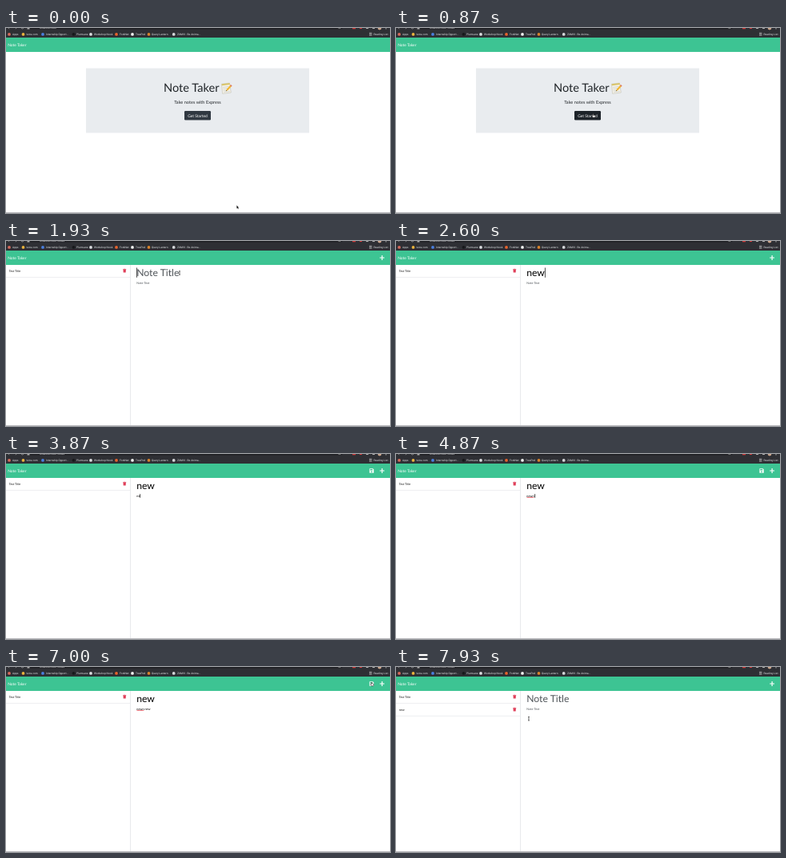
An HTML page for the animation above (8000 ms loop, 480 by 232 pixels).

```html
<!DOCTYPE html>
<html lang="en">
<head>
<meta charset="utf-8">
<title>Note Taker</title>
<style>
  html, body { margin: 0; width: 100%; height: 100%; overflow: hidden; background: #fff; }
  svg { display: block; width: 100%; height: 100%; }
  text { font-family: Lato, sans-serif; text-rendering: geometricPrecision; white-space: pre; }
  .chrome text { font: 3.3px Roboto, sans-serif; fill: #e4e5e8; }
  .mid { text-anchor: middle; }
  .title { font-size: 12.2px; }
  .body { font-size: 3.8px; }
  .item { font-size: 3.7px; fill: #111; }
</style>
</head>
<body>
<svg viewBox="0 0 480 232" preserveAspectRatio="none">
  <defs>
    <g id="trash" fill="#e0405a">
      <path d="M-2-2.2h1.2l.3-.4h1l.3.4H2v.6h-4zM-1.7-1.3h3.4l-.2 3.6h-3z"/>
    </g>
  </defs>
  <rect width="480" height="232" fill="#fff"/>

  <g class="chrome">
    <rect width="480" height="12" fill="#2e2f34"/>
    <path d="M26 0H421Q420 1.6 417 1.6H30Q27 1.6 26 0z" fill="#1e1f23"/>
    <path d="M3 0l1 1.2M12 1.2l1-1.2M19 .3q1.5 1.4 3 0" stroke="#bbb" stroke-width=".6" fill="none"/>
    <path d="M26.5 0h3v1.4h-3zM415.5 0l.2 1 1.2-.7 1.2.7.2-1z" fill="#aaa"/>
    <text x="42" y=".9">localhost:3001<tspan id="path">/notes</tspan></text>
    <path d="M433 0h4v1.2h-4zM442 0h3v1h-3z" fill="#d33a3a"/>
    <path d="M450 0h3v1h-3zM458 0h3v1h-3zM474.5 0h1v1.4h-1z" fill="#aaa"/>
    <circle cx="467" cy="0" r="2.4" fill="#c9a58c"/>
    <g id="marks"></g>
    <path d="M454 6.2h3.4M454 7.7h3.4M454 9.2h3.4" stroke="#ccc" stroke-width=".7"/>
    <text x="459.5" y="9.1">Reading List</text>
  </g>

  <rect y="12" width="480" height="18" fill="#3dc493"/>
  <text x="2.2" y="22.7" font-size="4.9" fill="#fff">Note Taker</text>

  <g id="home">
    <rect x="100" y="50.5" width="279" height="81" fill="#e9ecef"/>
    <text x="197" y="80" font-size="14.6" fill="#212529">Note Taker</text>
    <g transform="translate(268 68)">
      <path d="M1.5 2.2L11.5 1 13.3 13 2.6 14.4z" fill="#f6f3e6" stroke="#b9b7ac" stroke-width=".5"/>
      <path d="M1.5 2.2L11.5 1l.3 2L1.8 4.2z" fill="#d8c46a"/>
      <path d="M3 6.3l7.6-.9M3.3 8.3l6-.7M3.6 10.4l4-.5M3.9 12.4l7.8-.9" stroke="#b4bcc6" stroke-width=".5"/>
      <path d="M6.8 11.2L8 8.4l4.7-5.1 1.6 1.5-4.8 5.2z" fill="#f2b632"/>
      <path d="M6.8 11.2l.5-1.2.8.7z" fill="#333"/>
      <path d="M12.1 3.9l.9-.9 1.6 1.5-.9.9z" fill="#d9706e"/>
    </g>
    <text class="mid" x="239.5" y="94.5" font-size="5.6" fill="#212529">Take notes with Express</text>
    <rect id="button" x="223" y="104" width="33" height="11.5" rx="1.2"/>
    <text class="mid" x="239.5" y="111.6" font-size="4.9" fill="#fff">Get Started</text>
  </g>

  <g id="notes">
    <path d="M155.5 30V231" stroke="#dfe1e4" stroke-width=".7"/>
    <g id="first">
      <text class="item" x="3.7" y="39.2">Test Title</text>
      <use href="#trash" x="148.2" y="37.3"/>
      <path d="M0 45.5H155" stroke="#e3e5e8" stroke-width=".6"/>
      <path d="M467.2 21h5.8M470.1 18.1v5.8" stroke="#fff" stroke-width="1.2"/>
    </g>
    <g id="second">
      <text class="item" x="3.7" y="55.1">new</text>
      <use href="#trash" x="148.2" y="53.3"/>
      <path d="M0 61.5H155" stroke="#e3e5e8" stroke-width=".6"/>
    </g>
    <path id="save" fill="#fff" fill-rule="evenodd"
      d="M454.4 18.2h4.2l1.1 1.1v4.5h-5.3zM455.2 19v1.5h3V19zM457 21.4a.85.85 0 1 0 .01 0z"/>
    <text id="title" class="title" x="163.2" y="44"></text>
    <text id="body" class="body" x="163.3" y="53.7"></text>
    <path id="squiggle" d="M163.5 54.5h8.8" stroke="#e2202c" stroke-width=".6"/>
    <rect id="caret" width=".7" fill="#000"/>
  </g>

  <path d="M0 231.5H480" stroke="#b9babd"/>
  <g id="mouse">
    <path id="arrow" d="M0 0V4.3l1-.9.7 1.5.8-.4-.7-1.4h1.3z" fill="#000" stroke="#fff" stroke-width=".3"/>
    <path id="hand" d="M-.8-2.2q.6-.5.9.2v1.3l1.6.5q.5.2.4.8L1.7 2.2H-.8L-2 .3q.2-.7 1.2 0z" fill="#fff" stroke="#000" stroke-width=".5"/>
    <path id="beam" d="M-.9-2.4q.9 0 .9.6 0-.6.9-.6M0-1.8v3.6M-.9 2.4q.9 0 .9-.6 0 .6.9.6" fill="none" stroke="#000" stroke-width=".6"/>
  </g>
</svg>
<script>
const $ = id => document.getElementById(id);
const LOOP = 8000, STEP = 200 / 3;

// Bookmarks: icon centre, label start, icon colour, label
$('marks').innerHTML = [
  [4, 8, '#d86a5c', 'Apps'],
  [21.5, 25.5, '#e8b13c', 'tutra.com'],
  [46, 50, '#4a7fe0', 'Internship Opport...'],
  [84.5, 88, '#17181b', 'Plumvane'],
  [106, 110, '#dcdde0', 'Workshop Nook'],
  [138, 142, '#e8622c', 'ForkNet'],
  [158, 162, '#f0f0f0', 'TreePod'],
  [178.5, 182, '#d9822b', 'Query Lantern'],
  [209.7, 214, '#d5d6d9', 'ZUMVI - Be Anima...']
].map(([cx, x, color, label]) =>
  `<circle cx="${cx}" cy="7.9" r="1.9" fill="${color}"/><text x="${x}" y="9.1">${label}</text>`).join('');

// Mouse path: time, x, y
const path = [
  [0, 288.3, 222.3], [67, 275, 190], [133, 259.5, 155], [200, 259.5, 155], [400, 268, 136],
  [600, 254, 116], [734, 247, 110], [1134, 247, 110], [1300, 244, 128], [1667, 217, 40],
  [2667, 217, 40], [2934, 212.5, 58], [6467, 212.5, 58], [6734, 458, 27], [6934, 457.5, 21.5],
  [7534, 457.5, 21.5], [7734, 230, 79], [7867, 160, 70], [7934, 166, 64.8]
];
const titleKeys = [[2267, 'n'], [2400, 'ne'], [2600, 'new']];
const bodyKeys = [[3667, 'n'], [3867, 'ne'], [4067, 'new'], [4334, 'newn'], [4800, 'newn '],
  [5800, 'newn n'], [6000, 'newn ne'], [6267, 'newn new']];
const caretOn = [[1934, 3067], [3134, 5267], [5534, 6867]];

const within = (t, a, b) => t >= a - 1 && t < b - 1;
const typed = (keys, t) => keys.reduce((s, [at, text]) => t >= at - 1 ? text : s, '');
const show = (id, on) => $(id).style.display = on ? '' : 'none';

function mouseAt(t) {
  const i = path.findIndex(p => p[0] > t);
  if (i < 0) return path[path.length - 1].slice(1);
  const [a, b] = [path[i - 1], path[i]], k = (t - a[0]) / (b[0] - a[0]);
  return [a[1] + (b[1] - a[1]) * k, a[2] + (b[2] - a[2]) * k];
}

function field(id, text, hint) {
  $(id).textContent = text || hint;
  $(id).setAttribute('fill', text ? '#000' : '#50555a');
}

function placeCaret(t) {
  const inBody = t > 3100, el = $(inBody ? 'body' : 'title');
  const text = inBody ? typed(bodyKeys, t) : typed(titleKeys, t);
  const width = text ? el.getComputedTextLength() : 0;
  $('caret').setAttribute('x', 163.2 + width);
  $('caret').setAttribute('y', inBody ? 50.2 : 33.5);
  $('caret').setAttribute('height', inBody ? 4.6 : 12.3);
}

function draw(now) {
  const t = Math.floor((now % LOOP + 4) / STEP) * STEP;
  const [x, y] = mouseAt(t), notes = t >= 1133, saved = t >= 7333;

  show('home', !notes);
  show('notes', notes);
  show('path', t >= 866);
  show('first', t >= 1199);
  show('second', saved);
  show('save', within(t, 3867, 7334));
  show('squiggle', within(t, 4800, 7334));
  show('caret', caretOn.some(([a, b]) => within(t, a, b)));
  $('button').setAttribute('fill', t >= 666 ? '#1d2329' : '#303841');
  field('title', saved ? '' : typed(titleKeys, t), 'Note Title');
  field('body', saved ? '' : typed(bodyKeys, t), 'Note Text');
  placeCaret(t);

  const hand = within(t, 667, 1200) || within(t, 6867, 7600);
  const beam = !hand && notes && x > 160 && y > 30;
  show('hand', hand);
  show('beam', beam);
  show('arrow', !hand && !beam);
  show('mouse', !within(t, 2267, 2667) && !within(t, 3734, 6534));
  $('mouse').setAttribute('transform', `translate(${x} ${y})`);
}

const start = performance.now();
(function tick() {
  draw(performance.now() - start);
  requestAnimationFrame(tick);
})();
</script>
</body>
</html>
```
